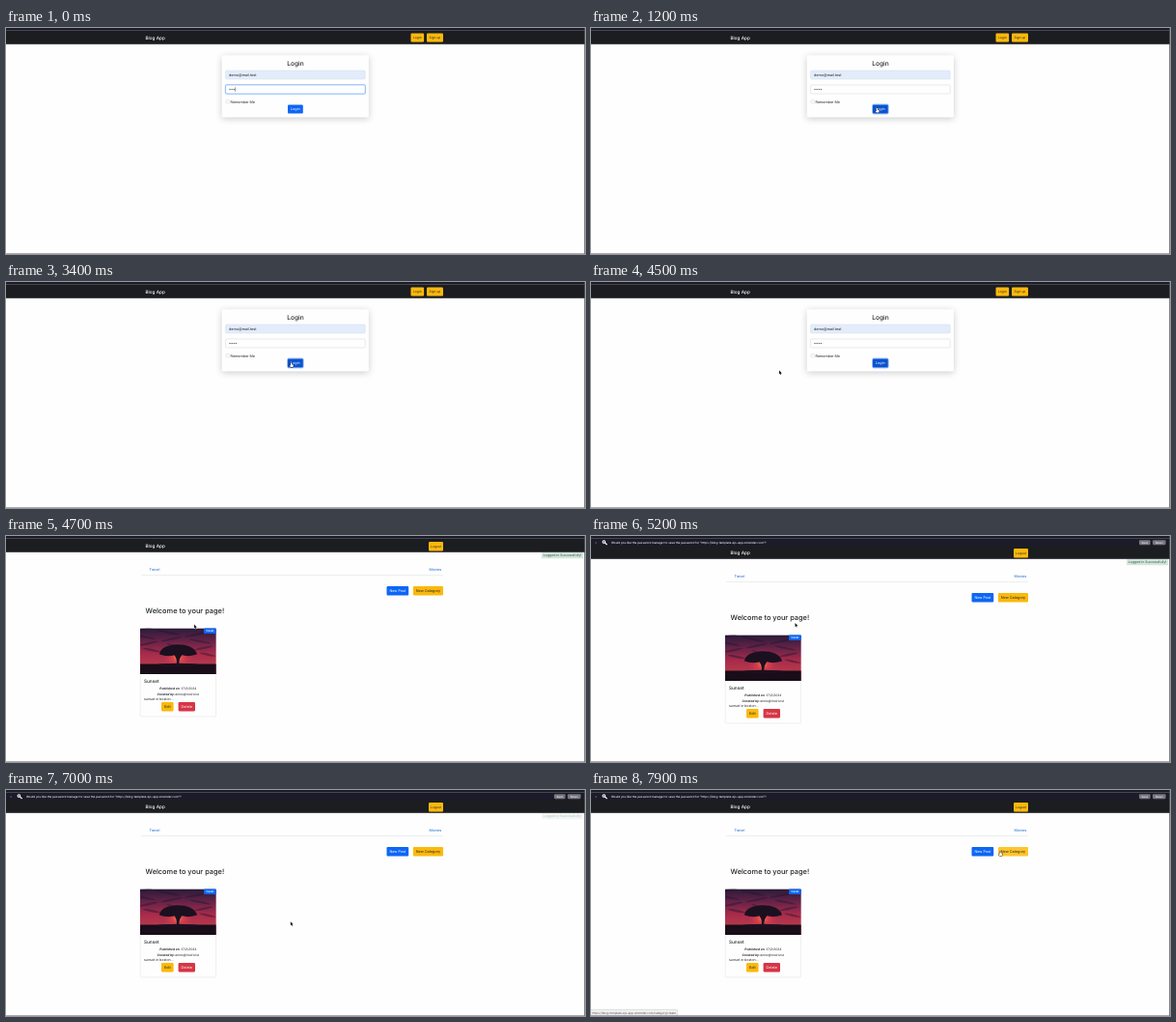
Recreate the animation shown at these times as an HTML page with a canvas. Size 600 by 234 pixels, loop 8000 ms.

```html
<!DOCTYPE html>
<html lang="en">
<head>
<meta charset="utf-8">
<title>Blog App</title>
<style>
html, body { margin: 0; width: 100%; height: 100%; overflow: hidden; background: #fefefe; }
canvas { display: block; width: 600px; height: 234px; }
</style>
</head>
<body>
<canvas id="stage"></canvas>
<script>
const W = 600, H = 234, LOOP = 8000, STEP = 100;
const LOGIN_CLICK = 1200, PAGE_SWITCH = 4600, BAR_START = 4700, BAR_TIME = 300, BAR_H = 7;
const SITE = 'https://blog-template-ejs-app.onrender.com';
const EMAIL = 'demo@mail.test';
const BLUE = '#0d66f5', YELLOW = '#fbb90c', INK = '#212529', DARK = '#1c1d21', STRIP = '#1b1b29';

const canvas = document.getElementById('stage');
const ctx = canvas.getContext('2d');
const dpr = window.devicePixelRatio || 1;
canvas.width = W * dpr;
canvas.height = H * dpr;

// Pointer path: time, x, y
const path = [
  [100, 314, 62], [900, 298, 82], [1400, 295.5, 83.5], [3700, 295.5, 83.5],
  [4100, 195, 91.5], [4700, 195, 91.5], [5200, 211.5, 90], [5400, 211.5, 90],
  [6000, 180, 186], [6300, 180, 186], [7100, 300, 134], [7700, 424, 63.5], [8000, 424, 63.5]
];

const links = {
  post: { x: 394.5, y: 52, w: 22.7, h: 9.6, url: '/post/create' },
  category: { x: 422, y: 52, w: 31, h: 9.6, url: '/category/create' },
  edit: { x: 161, y: 172, w: 12.6, h: 9.4, url: '/post/edit/65a5b09fcd0f5f57f35a3481' },
  del: { x: 178.6, y: 172, w: 17.4, h: 9.4, url: '/post/delete/65a5b09fcd0f5f57f35a3481' }
};
const loginButton = { x: 292, y: 79.5, w: 15.8, h: 9 };

const clamp = v => Math.max(0, Math.min(1, v));
const ease = v => v * v * (3 - 2 * v);
const inside = (p, r, dy = 0) =>
  p.x >= r.x && p.x <= r.x + r.w && p.y >= r.y + dy && p.y <= r.y + dy + r.h;

function pointerAt(t) {
  if (t < path[0][0]) return null;
  const i = path.findIndex(k => k[0] > t);
  const [t0, x0, y0] = path[i - 1], [t1, x1, y1] = path[i];
  const k = ease((t - t0) / (t1 - t0));
  return { x: x0 + (x1 - x0) * k, y: y0 + (y1 - y0) * k };
}

function rect(x, y, w, h, fill) {
  ctx.fillStyle = fill;
  ctx.fillRect(x, y, w, h);
}

function box(x, y, w, h, r, fill, stroke, line = 0.4) {
  ctx.beginPath();
  ctx.roundRect(x, y, w, h, r);
  if (fill) { ctx.fillStyle = fill; ctx.fill(); }
  if (stroke) { ctx.strokeStyle = stroke; ctx.lineWidth = line; ctx.stroke(); }
}

function text(str, x, y, size, color = INK, weight = 400, align = 'left', style = '') {
  ctx.font = `${style} ${weight} ${size}px Inter, "Open Sans", sans-serif`;
  ctx.textAlign = align;
  ctx.fillStyle = color;
  ctx.fillText(str, x, y);
  return ctx.measureText(str).width;
}

function button(r, label, fill, color, size = 3.75, border) {
  box(r.x, r.y, r.w, r.h, 1.1, fill, border);
  text(label, r.x + r.w / 2, r.y + r.h / 2 + size * 0.36, size, color, 400, 'center');
}

// Two runs of italic text centred as one line
function caption(label, value, cx, y, size) {
  ctx.font = `italic 700 ${size}px Inter, "Open Sans", sans-serif`;
  const a = ctx.measureText(label).width;
  ctx.font = `italic 400 ${size}px Inter, "Open Sans", sans-serif`;
  const x = cx - (a + ctx.measureText(value).width) / 2;
  text(label, x, y, size, INK, 700, 'left', 'italic');
  text(value, x + a, y, size, INK, 400, 'left', 'italic');
}

function navbar() {
  rect(0, 2.5, W, 14.3, DARK);
  text('Blog App', 144.5, 11.7, 4.7, '#fff', 500);
}

function loginPage(t, p) {
  navbar();
  button({ x: 419.5, y: 5.4, w: 13.6, h: 9.2 }, 'Login', YELLOW, INK, 3.3);
  button({ x: 436, y: 5.4, w: 17, h: 9.2 }, 'Sign up', YELLOW, INK, 3.3);

  ctx.save();
  ctx.shadowColor = 'rgba(0,0,0,.2)';
  ctx.shadowBlur = 7 * dpr;
  ctx.shadowOffsetY = 1.5 * dpr;
  box(223.7, 28.2, 152.2, 64.2, 0.8, '#fefefe');
  ctx.restore();
  text('Login', 300, 38.6, 6.6, INK, 500, 'center');

  box(227.6, 44, 144.6, 9, 1.2, '#e3ecfb', '#cbd3de');
  text(EMAIL, 231, 49.9, 3.75);

  const typing = t < LOGIN_CLICK;
  if (typing) box(227.4, 58.8, 145, 9.4, 1.4, null, 'rgba(60,135,245,.4)', 1.3);
  box(227.6, 59, 144.6, 9, 1.2, '#fefefe', typing ? '#5a9cf8' : '#ced4da', 0.5);
  const dots = t < 100 ? 3 : 4;
  for (let i = 0; i < dots; i++) {
    ctx.beginPath();
    ctx.arc(232 + i * 2.1, 63.6, 0.6, 0, 7);
    ctx.fillStyle = INK;
    ctx.fill();
  }
  if (typing && t % 1000 < 500) rect(231.2 + dots * 2.1, 61.4, 0.45, 4.4, INK);

  box(228, 74.6, 3.3, 3.3, 0.7, '#fefefe', '#c4c8cc');
  text('Remember Me', 232.6, 77.7, 3.7);

  const hover = p && inside(p, loginButton);
  if (!typing) box(291.6, 79.1, 16.6, 9.8, 1.5, null, 'rgba(13,102,245,.45)', 1);
  button(loginButton, 'Login', hover || !typing ? '#0a53cf' : BLUE, '#fff');
  return hover;
}

function sunset(x, y, w, h) {
  ctx.save();
  ctx.beginPath();
  ctx.rect(x, y, w, h);
  ctx.clip();
  ctx.translate(x, y);

  const sky = ctx.createLinearGradient(0, 0, 0, 38);
  [[0, '#2a1b3a'], [0.35, '#652347'], [0.7, '#a92b4b'], [1, '#b63a4c']]
    .forEach(([at, c]) => sky.addColorStop(at, c));
  rect(0, 0, w, h, sky);

  ctx.fillStyle = 'rgba(35,20,48,.45)';
  for (let i = 0; i < 12; i++) {
    ctx.beginPath();
    ctx.ellipse((i * 29) % 83, 2 + i * 2.3, 13 - i * 0.4, 1.1, i % 2 ? 0.2 : -0.2, 0, 7);
    ctx.fill();
  }

  const glow = ctx.createRadialGradient(39, 30, 0, 39, 30, 16);
  glow.addColorStop(0, '#ff9a5c');
  glow.addColorStop(0.3, 'rgba(235,75,75,.75)');
  glow.addColorStop(1, 'rgba(200,45,75,0)');
  rect(0, 0, w, h, glow);

  rect(0, 37, w, h, '#180d19');
  ctx.fillStyle = '#1b1020';
  ctx.beginPath();
  ctx.moveTo(20, 27);
  ctx.bezierCurveTo(21, 14, 56, 13, 59, 27);
  ctx.quadraticCurveTo(49, 30, 43, 27.5);
  ctx.quadraticCurveTo(39, 26, 35, 28);
  ctx.quadraticCurveTo(28, 30, 20, 27);
  ctx.fill();
  ctx.beginPath();
  ctx.moveTo(34, 26);
  ctx.quadraticCurveTo(39, 31, 37.7, 38);
  ctx.lineTo(40.4, 38);
  ctx.quadraticCurveTo(39.5, 31, 45, 26);
  ctx.fill();
  ctx.beginPath();
  ctx.ellipse(39, 38, 22, 1.8, 0, 0, 7);
  ctx.fill();
  ctx.restore();
}

function toast(t) {
  ctx.save();
  ctx.globalAlpha = 1 - clamp((t - 6300) / 1000);
  box(555, 17, 43, 6.2, 0.8, '#d3e5db');
  text('Logged in Successfully!', 576.6, 21.3, 3.5, '#35574a', 400, 'center');
  ctx.restore();
}

function homePage(t, p, dy) {
  const hot = Object.keys(links).find(k => p && inside(p, links[k], dy));
  ctx.save();
  ctx.translate(0, dy);
  navbar();
  button({ x: 438, y: 6, w: 15, h: 9.6 }, 'Logout', YELLOW, INK, 3.3);

  text('Travel', 148.5, 36.2, 3.75, '#1766d6');
  text('Movies', 438.5, 36.2, 3.75, '#1766d6');
  rect(140, 40.2, 313, 0.5, '#d9dde1');

  button(links.post, 'New Post', hot === 'post' ? '#0a53cf' : BLUE, '#fff');
  button(links.category, 'New Category', hot === 'category' ? '#ffc52b' : YELLOW, INK);
  text('Welcome to your page!', 144.6, 80.2, 7.4, INK, 500);

  box(139.2, 95.5, 78.4, 91.4, 1, '#fefefe', '#d8d8da');
  sunset(139, 95.5, 78.8, 47.6);
  box(205, 95.5, 12.7, 5.6, 1, BLUE);
  text('travel', 211.3, 99.3, 2.8, '#fff', 700, 'center');
  text('Sunset', 143, 151.7, 4.7, INK, 500);
  caption('Published on :', '17/2/2024', 178.3, 158.8, 3.25);
  caption('Created by:', EMAIL, 178.3, 164.9, 3.25);
  text('sunset in boston...', 143, 170.4, 3.55);
  button(links.edit, 'Edit', hot === 'edit' ? '#ffc52b' : YELLOW, INK);
  const delHot = hot === 'del';
  button(links.del, 'Delete', delHot ? '#b52a38' : '#d63545', '#fff', 3.75, delHot ? '#8f2430' : null);
  toast(t);
  ctx.restore();
  return hot;
}

function passwordBar(dy) {
  if (!dy) return;
  ctx.save();
  ctx.beginPath();
  ctx.rect(0, 2.5, W, dy + 0.8);
  ctx.clip();
  ctx.translate(0, dy - BAR_H);
  rect(0, 0, W, 10.3, STRIP);
  text('×', 5.2, 7.8, 3.4, '#aaa', 400, 'center');

  ctx.strokeStyle = '#fff';
  ctx.lineWidth = 1.1;
  ctx.beginPath();
  ctx.arc(13.4, 6, 1.3, 0, 7);
  ctx.moveTo(14.3, 6.9);
  ctx.lineTo(16.6, 9);
  ctx.stroke();

  text(`Would you like the password manager to save the password for "${SITE}"?`, 21, 7.8, 3.02, '#f2f2f4', 500);
  [['Save', 568, 11.6], ['Never', 582, 13.6]].forEach(([label, x, w]) =>
    button({ x, y: 4.2, w, h: 5 }, label, '#77777f', '#fff', 2.9));
  ctx.restore();
}

function statusBar(url) {
  ctx.font = '400 3px Inter, "Open Sans", sans-serif';
  const w = ctx.measureText(url).width + 3.2;
  box(-1, 227.4, w + 1, 8, 0.8, '#f1f1f2', '#b9b9bc');
  text(url, 1.6, 232.2, 3, '#4a4a4e');
}

function pointer(p, hand) {
  ctx.save();
  ctx.translate(p.x, p.y);
  ctx.beginPath();
  const shape = hand
    ? [[-0.5, 0], [0.5, 0], [0.6, 1.7], [2.3, 2.2], [2, 4.6], [-0.7, 4.6], [-1.8, 2.7], [-0.5, 2.9]]
    : [[0, 0], [0, 4], [0.9, 3.2], [1.5, 4.6], [2.2, 4.3], [1.6, 3], [2.8, 2.9]];
  shape.forEach(([x, y]) => ctx.lineTo(x, y));
  ctx.closePath();
  ctx.strokeStyle = hand ? '#111' : '#fff';
  ctx.fillStyle = hand ? '#fff' : '#111';
  ctx.lineWidth = 0.7;
  ctx.stroke();
  ctx.fill();
  ctx.restore();
}

function draw(t) {
  ctx.setTransform(dpr, 0, 0, dpr, 0, 0);
  ctx.textRendering = 'geometricPrecision';
  rect(0, 0, W, H, '#fefefe');
  const p = pointerAt(t);
  let hand;
  if (t < PAGE_SWITCH) {
    hand = loginPage(t, p);
  } else {
    const dy = BAR_H * ease(clamp((t - BAR_START) / BAR_TIME));
    const hot = homePage(t, p, dy);
    passwordBar(dy);
    if (hot) statusBar(SITE + links[hot].url);
    hand = !!hot;
  }
  rect(0, 0, W, 2.6, STRIP);
  rect(599.3, 0, 0.7, H, '#55555c');
  rect(0, 233.4, W, 0.6, '#77777c');
  if (p) pointer(p, hand);
}

function tick(now) {
  draw(Math.floor((now % LOOP) / STEP) * STEP);
  requestAnimationFrame(tick);
}
requestAnimationFrame(tick);
</script>
</body>
</html>
```
